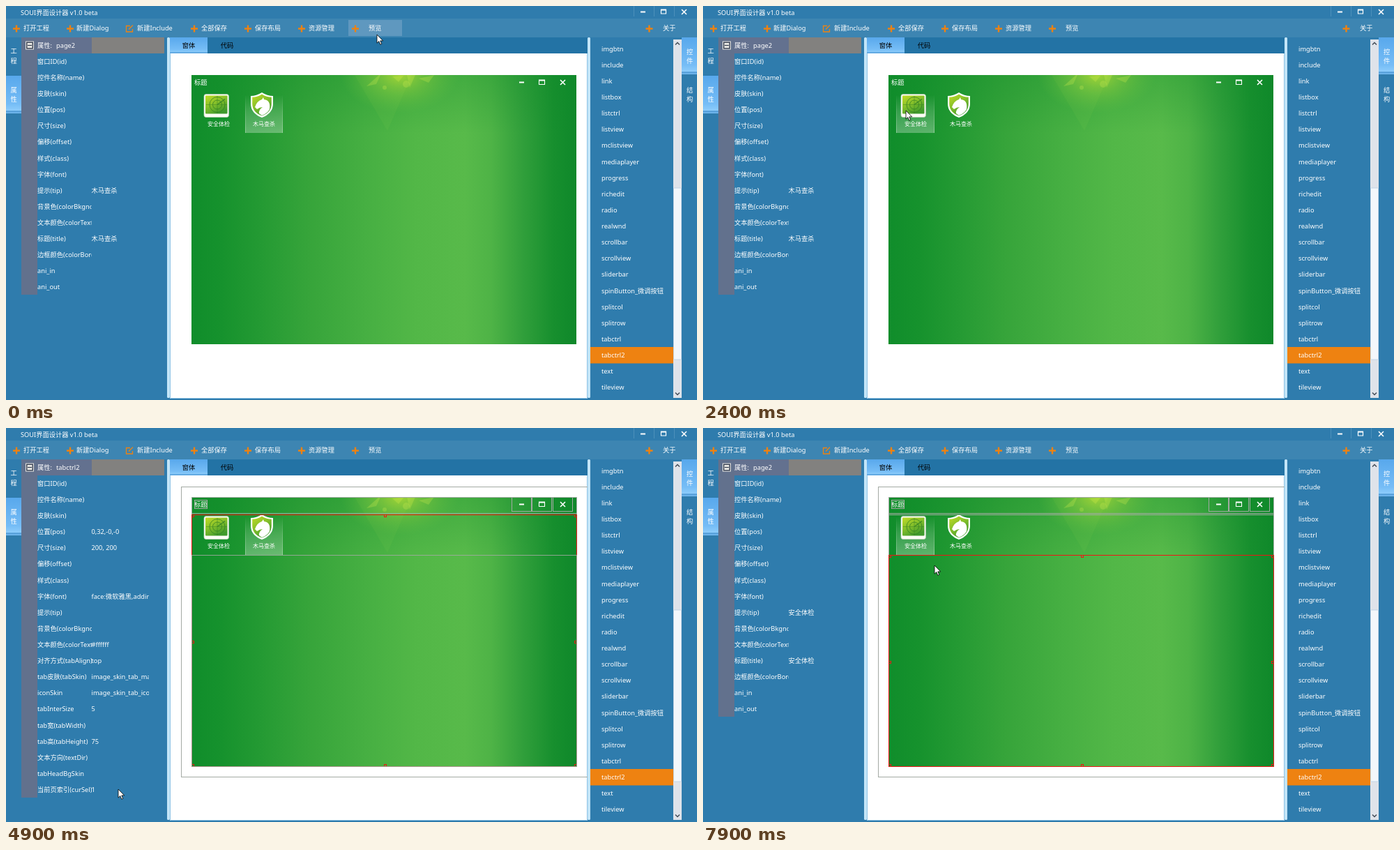
Recreate the animation shown at these times as an HTML page. Size 991 by 565 pixels, loop 8000 ms.

```html
<!DOCTYPE html>
<html lang="zh-CN">
<head>
<meta charset="utf-8">
<title>SOUI</title>
<style>
html, body { margin: 0; width: 100%; height: 100%; overflow: hidden; background: #2f7cad; }
svg { display: block; width: 991px; height: 565px; }
text { font: 9.26px "Noto Sans", "Noto Sans CJK SC", "Noto Sans CJK", sans-serif; fill: #fff; white-space: pre; }
.mid { text-anchor: middle; }
.small { font-size: 8px; }
.line { fill: none; stroke: #fff; }
.grey { fill: none; stroke: #a3aaa3; }
.red { fill: none; stroke: #f01414; }
.step { animation: 8s step-end -5ms infinite; }
</style>
</head>
<body>
<svg id="stage" viewBox="0 0 991 565"></svg>
<script>
const ROW = 23.12, TOP = 45, ORANGE = '#ee8211';

const rect = (x, y, w, h, fill, more = '') =>
  `<rect x="${x}" y="${y}" width="${w}" height="${h}" fill="${fill}" ${more}/>`;
const box = (x, y, x2, y2, cls) =>
  `<rect x="${x + .5}" y="${y + .5}" width="${x2 - x}" height="${y2 - y}" class="${cls}"/>`;
const path = (d, more) => `<path d="${d}" ${more}/>`;
// y is the vertical centre of the line
const text = (x, y, s, more = '') => `<text x="${x}" y="${y + 3.4}" ${more}>${s}</text>`;
const step = (name, body) => `<g class="step" style="animation-name:${name}">${body}</g>`;
const stack = (x, y, s) => [...s].map((c, i) => text(x, y + i * 13.5, c, 'class="mid"')).join('');
const gradient = (id, stops, dir = 'x2="0" y2="1"') =>
  `<linearGradient id="${id}" ${dir}>` + stops.split(' ').map(s => {
    const [at, color, alpha = 1] = s.split('/');
    return `<stop offset="${at}%" stop-color="${color}" stop-opacity="${alpha}"/>`;
  }).join('') + '</linearGradient>';

// ---- timing: "ms value" pairs become stepped keyframes
let css = '';
function track(name, prop, spec) {
  css += `@keyframes ${name}{` + spec.split(';').map(s => {
    const [ms, v] = s.trim().split(' ');
    const value = prop === 'transform' ? `translate(${v.split(',').map(n => n + 'px')})` : v;
    return `${ms / 80}%{${prop}:${value}}`;
  }).join('') + '}';
}
track('cursor', 'transform', `0 532,41; 100 500,62; 200 440,96; 300 385,128; 400 340,146; 500 321,150;
  1100 345,150; 1200 365,148; 1800 310,152; 1900 291,150; 2500 330,128; 2600 420,85; 2700 500,48;
  2800 532,34; 3000 533,33; 3400 520,42; 3500 470,75; 3600 400,115; 3700 345,145; 3800 325,156;
  4500 315,185; 4600 270,290; 4700 190,470; 4800 163,536; 4900 161,518; 6800 182,527; 6900 195,505;
  7000 250,425; 7100 320,325; 7200 360,272; 7300 365,264; 7900 332,197`);
track('click', 'opacity', `0 0; 700 1; 800 0; 1500 1; 1600 0; 2100 1; 2200 0; 3000 1; 3200 0;
  4000 1; 4200 0; 5000 1; 5100 0; 7300 1; 7400 0`);
track('arrow', 'opacity', '0 1; 5100 0; 6800 1');
track('ibeam', 'opacity', '0 0; 5100 1; 5700 0');
track('hover', 'opacity', '0 1; 100 0; 2800 1; 3500 0');
track('tab1', 'opacity', '0 0; 500 .5; 700 1; 1500 0; 1800 .5; 2100 1; 3100 0; 6200 1');
track('tab2', 'opacity', '0 1; 700 0; 1100 .5; 1500 1; 2100 0; 3100 1; 6200 0');
track('design', 'opacity', '0 0; 3100 1');
track('pageA', 'opacity', '0 1; 3100 0');
track('root', 'opacity', '0 0; 3100 1; 4100 0');
track('notRoot', 'opacity', '0 0; 4100 1');
track('tabs', 'opacity', '0 0; 4100 1; 7300 0');
track('pageB', 'opacity', '0 0; 7300 1');
track('editRow', 'opacity', '0 0; 5000 1');
track('oldValue', 'opacity', '0 1; 5700 0');
track('newValue', 'opacity', '0 0; 5700 1');

// ---- property panels
const rowTop = i => Math.floor(TOP + i * ROW);
function panel(list, right = 227, under = '') {
  const rows = list.split(';');
  const end = Math.min(560, rowTop(rows.length));
  let names = '', values = '', heads = '';
  rows.forEach((row, i) => {
    const y = rowTop(i), mid = TOP + (i + .5) * ROW - .3;
    if (row[0] === '#') {
      const c = y + 11.5;
      heads += rect(45, y, 78, 23, '#63718f') + rect(123, y, right - 123, 23, '#82817f') +
        rect(28.5, c - 5.5, 11, 11, '#3c4557', 'stroke="#e6e6e2"') +
        rect(30.5, c - 3.5, 7, 7, '#efeee8') + path(`M31 ${c}h6`, 'stroke="#3c4557" stroke-width="1.4"') +
        text(45, mid, '属性:') + text(72, mid, row.slice(1));
    } else {
      const [name, value = ''] = row.split('|');
      names += text(45, mid, name);
      values += text(122.5, mid, value);
    }
  });
  return rect(22, TOP, 23, end - TOP, '#62718d') + heads + under +
    `<g clip-path="url(#names)">${names}</g><g clip-path="url(#values)">${values}</g>`;
}
const common = '窗口ID(id);控件名称(name);皮肤(skin);';
const place = '位置(pos)P;尺寸(size)S;偏移(offset);样式(class);';
const colors = '背景色(colorBkgnd);文本颜色(colorText)';
const page = s => panel('#page2;' + common + place.replace('P', '').replace('S', '') +
  `字体(font);提示(tip)|${s};${colors};标题(title)|${s};边框颜色(colorBorder);ani_in;ani_out`);
const rootPanel = panel('#SOUI;标题(title)|布局;宽度(width)|716;高度(height)|500;边距(margin)|1,5,5,5;' +
  '最小宽高(minsize);样式(wndStyle);大小可变(resizable);半透明(translucent);appWnd(appWnd);' +
  'toolWindow(toolWindow)|1;小图标(smallIcon)|ICON_LOGO:16;大图标(bigIcon)|ICON_LOGO:32;#root;' +
  common + '样式(class);字体(font);提示(tip);' + colors + ';', 215);
const editY = rowTop(20);
const tabsPanel = panel('#tabctrl2;' + common + place.replace('P', '|0,32,-0,-0').replace('S', '|200, 200') +
  `字体(font)|face:微软雅黑,adding:0;提示(tip);${colors}|#ffffff;对齐方式(tabAlign)|top;` +
  'tab皮肤(tabSkin)|image_skin_tab_main;iconSkin|image_skin_tab_icon;tabInterSize|5;tab宽(tabWidth);' +
  'tab高(tabHeight)|75;文本方向(textDir);tabHeadBgSkin;当前页索引(curSel)', 227,
  step('editRow', rect(45, editY, 78, 23, ORANGE))) +
  step('oldValue', text(122.5, editY + 11.5, '1')) + step('newValue', text(122.5, editY + 11.5, '0'));

function scrollbar(x, top, bottom, from, to) {
  const m = x + 6;
  return rect(x, top, 12, bottom - top, '#dfe3ea') +
    rect(x + .5, from, 11, to - from, '#f3f7fb', 'rx="1" stroke="#b9cfe2" stroke-width=".8"') +
    path(`M${m - 3} ${top + 7.5}l3 -3 3 3M${m - 3} ${bottom - 7.5}l3 3 3 -3`,
      'fill="none" stroke="#444d58" stroke-width="1.5"');
}

// ---- main chrome
const plus = x => path(`M${x - 5} 32.5h10M${x} 27.5v10`, `stroke="${ORANGE}" stroke-width="2.4"`);
const tools = [[15, 25, '打开工程'], [92, 101, '新建Dialog'], [0, 188, '新建Include'], [270, 280, '全部保存'],
  [347, 357, '保存布局'], [424, 434, '资源管理'], [501, 520, '预览'], [922.5, 942, '关于']]
  .map(([p, x, s]) => (p ? plus(p) : '') + text(x, 31.5, s)).join('') +
  path('M178 28.5h-5.500v8.500h9v-4M176 33.500l6 -6', `fill="none" stroke="${ORANGE}" stroke-width="1.3"`);

const controls = ('imgbtn include link listbox listctrl listview mclistview mediaplayer progress richedit radio ' +
  'realwnd scrollbar scrollview sliderbar spinButton_微调按钮 splitcol splitrow tabctrl tabctrl2 text tileview')
  .split(' ').map((s, i) => text(854, 61.2 + i * 23.13, s)).join('');

const chrome = rect(0, 0, 991, 565, '#2f7cad') + rect(0, 18, 991, 27, '#3d85b2') +
  text(21, 9.5, 'SOUI界面设计器 v1.0 beta') +
  path('M900.500 0v15M929.500 0v15M958.500 0v15', 'stroke="#5b9ac2" stroke-width=".7"') +
  path('M910 8.500h7', 'class="line" stroke-width="2"') +
  path('M939.500 5h7v6h-7zM939.500 6h7', 'class="line" stroke-width="1.2"') +
  path('M969 5l7 7M976 5l-7 7', 'class="line" stroke-width="1.5"') +
  step('hover', rect(491, 20, 77, 23, '#5f98bf')) + tools +
  rect(0, 100, 22, 54, 'url(#tab)') + stack(11, 65, '工程') + stack(11, 120.5, '属性') +
  rect(235, 45, 599, 23.5, '#2373a5') + rect(235, 45, 54, 23, 'url(#tab)') +
  text(262, 56.5, '窗体', 'class="mid" style="fill:#000"') + text(317, 56.5, '代码', 'class="mid" style="fill:#000"') +
  rect(235, 68, 599, 495, '#fff') + path('M235.500 68v494.500h598v-494.500', 'fill="none" stroke="#8fc3e6"') +
  rect(231, 45, 4, 517, '#c3e5f8', 'rx="1.5"') + rect(834, 45, 4, 517, '#c3e5f8', 'rx="1.5"') +
  rect(838, 489, 119, 23.5, ORANGE) + controls + scrollbar(957, 48, 562, 261, 507) +
  rect(969, 45, 22, 53, 'url(#tab)') + stack(980.500, 65.5, '控件') + stack(980.500, 120.5, '结构');

// ---- designed window
const shield = 'M0 -18q8 5 16 5v11q0 14 -16 20q-16 -6 -16 -20v-11q8 0 16 -5z';
const radar = rect(284, 126.500, 35.500, 33, '#fbfdf6', 'rx="3" stroke="#b9cdb0" stroke-width=".7"') +
  rect(286, 128.500, 31.500, 26, 'url(#lime)', 'rx="1"') +
  '<g fill="none" stroke="#2f7d25" stroke-width=".9" opacity=".8"><circle cx="303" cy="141.5" r="11"/>' +
  '<circle cx="303" cy="141.5" r="6.500"/>' + path('M287 141.500h30M303 129v25', 'opacity=".6"') +
  path('M303 141.500l11 -8', 'stroke-width="1.5"') + '</g>';
const horse = '<g transform="translate(367 142)">' + path(shield, 'fill="#fff"') +
  path(shield, 'fill="url(#lime)" transform="scale(.86)"') +
  path('M2 -11l-2 3q-7 2 -10 11l3 3q4 -3 8 -3q-6 4 -5 9l4 3q8 -3 11 -9q2 -13 -8 -14z', 'fill="#fff"') + '</g>';
const glow = '<g clip-path="url(#win)">' + rect(266, 99, 552, 84, 'url(#shade)') +
  '<ellipse cx="565" cy="99" rx="85" ry="55" fill="url(#glow)"/>' +
  path('M500 99l47 80 35 -80z', 'fill="#c0e85a" opacity=".05"') +
  path('M535 99l-18 16 14 -3 6 -13zM554 101l9 8 7 -9zM575 99l4 18 8 -18zM592 104l14 6 8 -11z', 'fill="#d8ef4e" opacity=".25"') +
  '<circle cx="543" cy="117" r="3" fill="#d8ef4e" opacity=".25"/><circle cx="574" cy="112" r="5" fill="#d8ef4e" opacity=".25"/></g>';
const highlight = (x, w) => rect(x, 127, w, 55, 'url(#sel)') +
  rect(x, 127, 1, 55, 'url(#sel)') + rect(x + w - 1, 127, 1, 55, 'url(#sel)');
const win = rect(266, 99, 552, 386, 'url(#green)') + glow + text(270, 109.3, '标题') +
  path('M736 109.500h7', 'class="line" stroke-width="2"') +
  path('M764.500 106h8v6.500h-8zM764.500 107h8', 'class="line" stroke-width="1.1"') +
  path('M795 106l7 7M802 106l-7 7', 'class="line" stroke-width="1.6"') +
  step('tab1', highlight(277, 55)) + step('tab2', highlight(343, 54)) +
  radar + horse + text(305, 169, '安全体检', 'class="mid small"') + text(370, 169, '木马查杀', 'class="mid small"');

// ---- design guides
function selected(x, y, x2, y2) {
  const xs = [x, Math.round((x + x2) / 2), x2 - 3], ys = [y, Math.round((y + y2) / 2), y2 - 3];
  let s = box(x, y, x2, y2, 'red');
  xs.forEach((a, i) => ys.forEach((b, j) => {
    if (i !== 1 || j !== 1) s += box(a, b, a + 3, b + 3, 'red');
  }));
  return s;
}
const guides = step('notRoot', box(251, 84, 834, 500, 'grey')) +
  box(266, 99, 818, 485, 'grey') + box(266, 99, 818, 122, 'grey') + box(266, 124, 818, 485, 'grey') +
  box(270, 103, 288, 115, 'grey') +
  [725, 754, 784].map(x => box(x, 99, x + 28, 119, 'grey')).join('') +
  step('tabs', selected(266, 124, 818, 485)) +
  `<g opacity=".85">${box(266, 182, 818, 485, 'grey')}</g>` +
  step('root', selected(251, 84, 834, 500)) + step('pageB', selected(266, 182, 818, 485));

const cursor = step('cursor',
  step('click', '<circle cx="6" cy="7" r="23" fill="#ff0" fill-opacity=".55"/>') +
  step('arrow', path('M0 0v12.200l2.800 -2.600 2 4.700 2 -.9 -2 -4.500h3.900z', 'fill="#fff" stroke="#000" stroke-width=".8"')) +
  step('ibeam', path('M-2.500 -6h2l.5 .5 .5 -.5h2M-2.500 6.500h2l.5 -.5 .5 .5h2M0 -5.500v11.500', 'fill="none" stroke="#fff" stroke-width=".9"')));

const defs = '<defs>' +
  gradient('tab', '0/#58a8ec 75/#76bdf6 92/#8cccfb 94/#4c97d3 100/#7cc0f5') +
  gradient('green', '0/#108d2b 8/#16922d 18/#249a33 30/#36a43a 45/#46af42 58/#52b747 71/#58ba4a 78/#4eb346 86/#319f3b 94/#178f2e 100/#0f882a', '') +
  gradient('lime', '0/#c3dc25 50/#86c02a 100/#3f9a2c', 'x2=".6" y2="1"') +
  gradient('sel', '0/#fff/0 45/#fff/.16 100/#fff/.3') +
  gradient('shade', '0/#0f8a2a/.3 100/#0f8a2a/0') +
  '<radialGradient id="glow"><stop offset="0" stop-color="#c2e032" stop-opacity=".75"/>' +
  '<stop offset=".45" stop-color="#98d23c" stop-opacity=".4"/><stop offset="1" stop-color="#70c442" stop-opacity="0"/></radialGradient>' +
  `<clipPath id="names">${rect(22, 45, 100.5, 515, '#000')}</clipPath>` +
  `<clipPath id="values">${rect(122, 45, 82.500, 515, '#000')}</clipPath>` +
  `<clipPath id="win">${rect(266, 99, 552, 386, '#000')}</clipPath>` +
  `<clipPath id="work">${rect(235, 68, 599, 494, '#000')}</clipPath></defs>`;

document.getElementById('stage').innerHTML = `<style>${css}</style>` + defs + chrome +
  step('pageA', page('木马查杀')) +
  step('root', rootPanel + scrollbar(215, 45, 560, 57, 531)) +
  step('tabs', tabsPanel) + step('pageB', page('安全体检')) +
  win + `<g clip-path="url(#work)">${step('design', guides)}</g>` + cursor;
</script>
</body>
</html>
```
